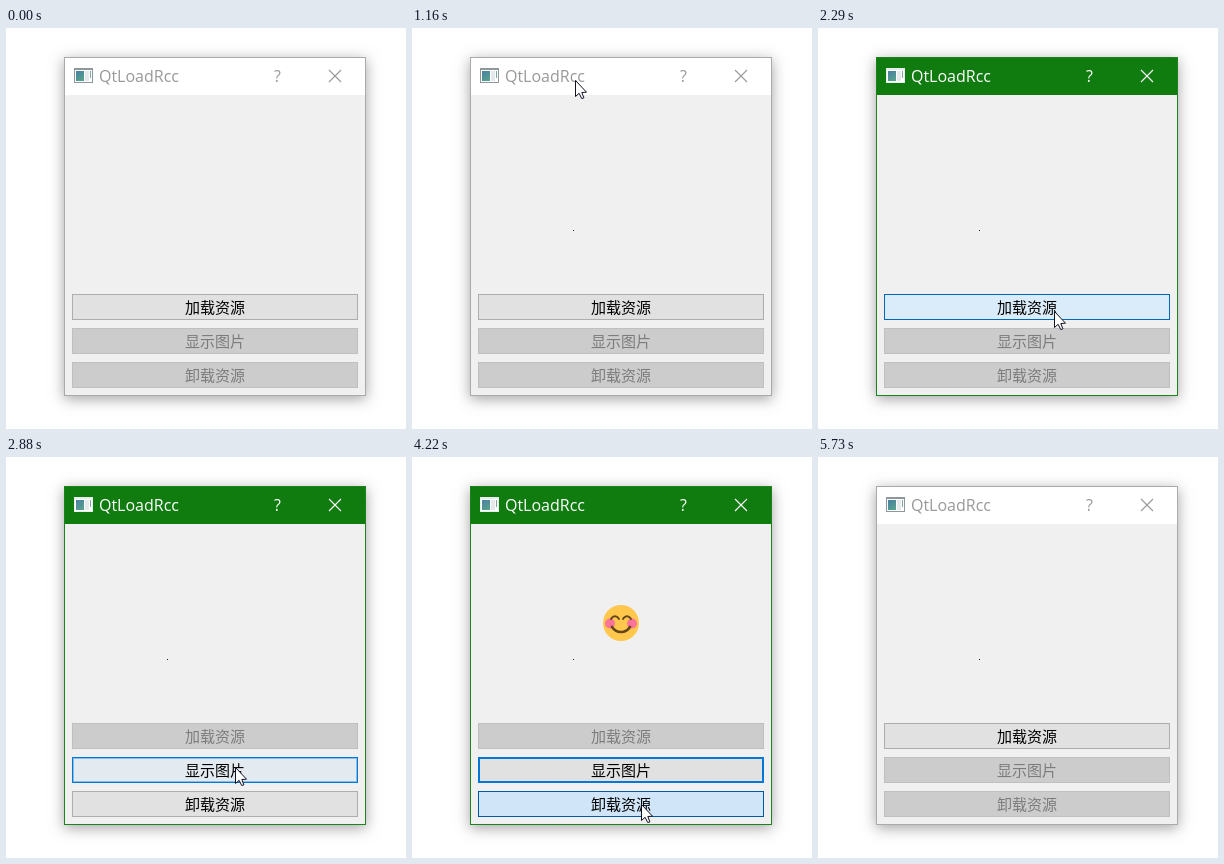
These frames come from a looping animation (400 by 401 pixels, 5.81 s). An HTML page with a canvas:

```html
<!DOCTYPE html>
<html lang="zh-CN">
<head>
<meta charset="utf-8">
<title>QtLoadRcc</title>
<style>
  html, body { margin: 0; width: 100%; height: 100%; overflow: hidden; background: #fff; }
  canvas { display: block; }
</style>
</head>
<body>
<canvas id="stage" width="400" height="401"></canvas>
<script>
const ctx = document.getElementById('stage').getContext('2d');
const LOOP = 5810;
const FADE = 250;
const STEP = 73;
const SPECK_FROM = 480;

const during = (t, from, to) => t >= from && t < to;
const windowActive = t => during(t, 1470, 5730);
const resourceLoaded = t => during(t, 2350, 4520);
const imageShown = t => during(t, 3260, 4520);
const pointerShown = t => during(t, 60, 5420);

const clamp = v => Math.max(0, Math.min(1, v));
const ease = k => k * k * (3 - 2 * k);
const lerp = (a, b, k) => a + (b - a) * k;
const mix = (a, b, k) => a.map((v, i) => lerp(v, b[i], k));
const rgb = c => `rgb(${c.map(Math.round).join(',')})`;

// Pointer moves: start and end time, then the point reached.
const MOVES = [
  [60, 400, 153, 184], [400, 550, 276, 182], [730, 1020, 158, 56],
  [1100, 1150, 163, 52], [1540, 2130, 236, 283], [2590, 2830, 229, 310],
  [3490, 3630, 229, 347], [4820, 4870, 244, 344], [4880, 5200, 315, 318],
  [5200, 5400, 338, 380]
];

// Spans of time in which each button is hovered and held down.
const BUTTONS = [
  { label: '加载资源', hover: [[200, 300], [1950, 2350]], press: [2180, 2350] },
  { label: '显示图片', hover: [[2730, 3575]], press: [3110, 3400] },
  { label: '卸载资源', hover: [[3610, 4520]], press: [4010, 4320] }
];

const FACE = [225, 225, 225], EDGE = [173, 173, 173], BLUE = [0, 120, 215];
const HOVER = [229, 241, 251], PRESSED = [204, 228, 247], NAVY = [0, 84, 153];

function pointerAt(t) {
  const now = 60 + Math.floor((t - 60) / STEP) * STEP;
  let x = 242, y = 341;
  for (const [from, to, toX, toY] of MOVES) {
    const k = ease(clamp((now - from) / (to - from)));
    x = lerp(x, toX, k);
    y = lerp(y, toY, k);
  }
  return [Math.round(x), Math.round(y)];
}

const fade = (t, [from, to]) => clamp((t - from) / FADE) - clamp((t - to) / FADE);

function rect(color, x, y, w, h) {
  ctx.fillStyle = color;
  ctx.fillRect(x, y, w, h);
}

function text(str, x, y, font, color, align = 'left') {
  ctx.font = font;
  ctx.fillStyle = color;
  ctx.textAlign = align;
  ctx.fillText(str, x, y);
}

function strokePath(color, width, build) {
  ctx.strokeStyle = color;
  ctx.lineWidth = width;
  ctx.beginPath();
  build();
  ctx.stroke();
}

function disc(color, x, y, r) {
  ctx.fillStyle = color;
  ctx.beginPath();
  ctx.arc(x, y, r, 0, 7);
  ctx.fill();
}

function drawIcon(active) {
  rect(active ? '#e8eeee' : '#8d979c', 68, 40, 19, 15);
  rect('#fff', 69, 42, 17, 12);
  const pane = ctx.createLinearGradient(70, 43, 77, 54);
  pane.addColorStop(0, '#4a7fa5');
  pane.addColorStop(1, '#58a689');
  rect(pane, 70, 43, 8, 10);
  rect('#e4eaec', 79, 43, 4, 10);
  rect('#7fa6a0', 84, 43, 1, 7);
}

function drawWindow(active) {
  ctx.save();
  ctx.shadowColor = 'rgba(0,0,0,.36)';
  ctx.shadowBlur = 13;
  ctx.shadowOffsetY = 3;
  rect(active ? '#1c821c' : '#aaa', 58, 29, 302, 339);
  ctx.restore();
  rect(active ? '#107c10' : '#fff', 59, 30, 300, 37);
  rect('#f0f0f0', 59, 67, 300, 300);

  const ink = active ? '#fff' : '#999';
  const titleFont = '16px "Open Sans", "Noto Sans", sans-serif';
  drawIcon(active);
  text('QtLoadRcc', 93, 54, titleFont, ink);
  text('?', 271.5, 54, titleFont, ink, 'center');
  strokePath(ink, 1.1, () => {
    ctx.moveTo(323, 42); ctx.lineTo(335, 54);
    ctx.moveTo(335, 42); ctx.lineTo(323, 54);
  });
}

function drawButton({ label, hover, press }, index, t) {
  const y = 266 + 34 * index;
  const loaded = resourceLoaded(t);
  const enabled = loaded === index > 0;
  const focused = windowActive(t) && index === (loaded ? 1 : 0);
  const over = Math.max(...hover.map(span => fade(t, span)));
  const down = fade(t, press);

  let fill = [204, 204, 204], border = [191, 191, 191], inner = fill, ink = '#7c7c7c';
  if (enabled) {
    fill = mix(mix(FACE, HOVER, over), PRESSED, down);
    border = mix(mix(focused ? BLUE : EDGE, BLUE, over), NAVY, down);
    inner = focused ? mix(BLUE, fill, over) : fill;
    ink = '#000';
  }
  rect(rgb(border), 66, y, 286, 26);
  rect(rgb(inner), 67, y + 1, 284, 24);
  rect(rgb(fill), 68, y + 2, 282, 22);
  text(label, 209, y + 19, '300 15px "Noto Sans CJK SC", "Noto Sans CJK", sans-serif', ink, 'center');
}

function drawSmiley() {
  const brown = '#65471b';
  disc('#ffc84d', 209, 166, 18);
  ctx.lineCap = 'round';
  for (const side of [-1, 1]) {
    disc('#fa7399', 209 + side * 11, 166.5, 5);
    strokePath(brown, 2, () => ctx.arc(209 + side * 6, 163.5, 4.2, Math.PI * 1.12, Math.PI * 1.88));
  }
  strokePath(brown, 2.6, () => ctx.arc(209, 164.5, 10.5, Math.PI * 0.17, Math.PI * 0.83));
  ctx.lineCap = 'butt';
}

function drawPointer(x, y) {
  const outline = [[0, 0], [0, 16], [3.6, 12.8], [6.2, 18], [8.4, 17.4], [6.3, 12], [11, 11.7]];
  ctx.fillStyle = '#fff';
  strokePath('#111122', 1, () => {
    for (const [dx, dy] of outline) ctx.lineTo(x + dx + 0.5, y + dy + 0.5);
    ctx.closePath();
    ctx.fill();
  });
}

function draw(t) {
  rect('#fff', 0, 0, 400, 401);
  drawWindow(windowActive(t));
  if (imageShown(t)) drawSmiley();
  if (t >= SPECK_FROM) rect('#222', 161, 202, 1, 1);
  BUTTONS.forEach((button, i) => drawButton(button, i, t));
  if (pointerShown(t)) drawPointer(...pointerAt(t));
}

const began = performance.now();
function tick() {
  draw((performance.now() - began) % LOOP);
  requestAnimationFrame(tick);
}
tick();
</script>
</body>
</html>
```
